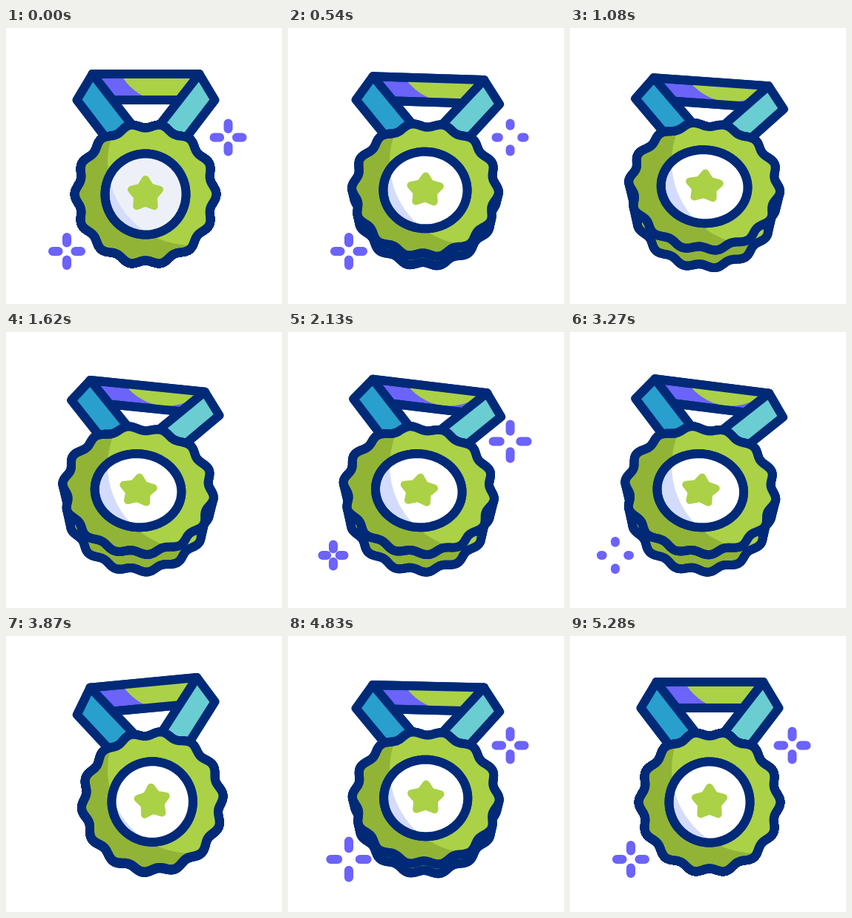
Recreate the animation shown at these times as an HTML page with a canvas. Size 372 px wide and 372 px high, loop 5.4 s.

```html
<!DOCTYPE html>
<html lang="en">
<head>
<meta charset="utf-8">
<title>Medal</title>
<style>
  html, body { margin: 0; height: 100%; overflow: hidden; background: #fff; }
  canvas { display: block; width: 100vw; height: 100vh; }
</style>
</head>
<body>
<canvas id="stage" width="372" height="372"></canvas>
<script>
const ctx = document.getElementById('stage').getContext('2d');
const LOOP = 5400, STEP = 30, REST = 5280, TAU = Math.PI * 2;
const NAVY = '#002a78', GREEN = '#abd147', DARK_GREEN = '#91b436', PURPLE = '#6b63fa';
const BLUE = '#289fcd', TEAL = '#69cdd2', LAVENDER = '#d3dcfc';

const clamp = x => Math.min(1, Math.max(0, x));
const progress = (t, from, to) => clamp((t - from) / (to - from));
const easeOut = x => Math.sin(x * TAU / 4);
function ramp(t, from, to) {
  const u = progress(t, from, to);
  return u * u * (3 - 2 * u);
}

// Lean back, hold, swing to the other side, rebound and settle
const RELEASE = 3250, SWING = 3860, REBOUND = 4500;

const tiltAt = t => 7.2 * easeOut(progress(t, 150, 2600))
  - 12.6 * ramp(t, RELEASE, SWING) + 7.6 * ramp(t, SWING, REBOUND) - 2.2 * ramp(t, REBOUND, REST);

const leanAt = t => 1.03 * ramp(t, 150, 900)
  - .98 * ramp(t, RELEASE, SWING) + .85 * ramp(t, SWING, REBOUND) - .9 * ramp(t, REBOUND, REST);

function polygon(points) {
  const path = new Path2D();
  points.forEach(([x, y]) => path.lineTo(x, y));
  path.closePath();
  return path;
}

function polar(count, radius) {
  return polygon(Array.from({ length: count }, (_, i) => {
    const angle = i / count * TAU - TAU / 4, r = radius(angle, i);
    return [r * Math.cos(angle), r * Math.sin(angle)];
  }));
}

const plate = polar(280, angle => 92.3 + 3 * Math.cos(14 * angle));
const star = polar(10, (angle, i) => i % 2 ? 11.5 : 20);
const disc = polar(120, () => 54.5);

// Ribbon parts are relative to the point where the medal hangs
const strapPoints = [[-72, -68], [-93, -33], [-51, 22], [-2, 22]];
const leftStrap = polygon(strapPoints);
const rightStrap = polygon(strapPoints.map(([x, y]) => [-x, y]));
const bar = polygon([[-72, -68], [72, -68], [47, -33], [-47, -33]]);

function place(path, x, y, tilt, sx, sy) {
  const placed = new Path2D();
  placed.addPath(path, new DOMMatrix().translate(x, y).rotate(tilt).scale(sx, sy));
  return placed;
}

function paint(path, fill, stroke, width) {
  ctx.fillStyle = fill;
  ctx.strokeStyle = stroke;
  ctx.lineWidth = width;
  ctx.fill(path);
  ctx.stroke(path);
}

// Light stays fixed on the stage while the parts move below it
function lit(path, shade, light, x, y, radius) {
  paint(path, shade, NAVY, 12);
  ctx.save();
  ctx.clip(path);
  ctx.fillStyle = light;
  ctx.beginPath();
  ctx.arc(x, y, radius, 0, TAU);
  ctx.fill();
  ctx.restore();
  ctx.stroke(path);
}

function sparkle(t, x, y, start, leave) {
  const out = progress(t, leave, leave + 400);
  if (t <= start || out === 1) return;
  const age = t - start;
  const size = 1.3 * easeOut(clamp(age / 300)) - .3 * ramp(age, 300, 650);
  const outer = 19 * size + .01;
  const inner = outer * (.6 + .4 * clamp(out / .85));
  ctx.strokeStyle = PURPLE;
  ctx.lineWidth = 12 * Math.min(1, size * 2, (1 - out) / .15);
  ctx.beginPath();
  for (const [dx, dy] of [[1, 0], [-1, 0], [0, 1], [0, -1]]) {
    ctx.moveTo(x + dx * inner, y + dy * inner);
    ctx.lineTo(x + dx * outer, y + dy * outer);
  }
  ctx.stroke();
}

// The left sparkle follows the right one
function sparklePair(t, leftX, start, leave, lag) {
  sparkle(t, 299.5, 147.5, start, leave);
  sparkle(t, leftX, 301, start + lag, leave + 310);
}

function draw(t) {
  const tilt = tiltAt(t), lean = leanAt(t);
  const x = 188 - 98 * Math.sin(tilt * TAU / 360);
  const mix = (front, back, depth) => 1 + lean * (front + (back - front) * depth);
  const ribbon = path =>
    place(path, 188.5 - .6 * tilt, 130, tilt, 1 + .075 * lean, 1 - .15 * lean);
  const medal = (path, depth = 0) =>
    place(path, x, 224 + lean * (23 * depth - 10), tilt, mix(.07, .01, depth), 1 - .09 * lean);

  ctx.fillStyle = '#fff';
  ctx.fillRect(0, 0, 372, 372);
  ctx.lineJoin = ctx.lineCap = 'round';

  sparklePair(t, 61, 1700, 2700, 310);
  sparklePair(t, 82, 4040, LOOP + 350, 460);
  sparklePair(t + LOOP, 82, 4040, LOOP + 350, 460);

  lit(ribbon(bar), PURPLE, GREEN, 217, 29, 70.5);
  paint(ribbon(leftStrap), BLUE, NAVY, 12);
  paint(ribbon(rightStrap), TEAL, NAVY, 12);

  // Solid rim between the front and the back of the medal
  for (let depth = 0; depth < 1; depth += .125) paint(medal(plate, depth), NAVY, NAVY, 12);
  for (const depth of [1, 0]) lit(medal(plate, depth), DARK_GREEN, GREEN, 250, 180, 113);

  lit(medal(disc), LAVENDER, t < 150 ? '#edf1f7' : '#fff', 250, 180, 113);
  paint(medal(star), GREEN, GREEN, 10);
}

const begin = performance.now();
function frame() {
  const t = (performance.now() - begin) % LOOP;
  draw(Math.min(REST, Math.floor(t / STEP) * STEP));
  requestAnimationFrame(frame);
}
frame();
</script>
</body>
</html>
```
